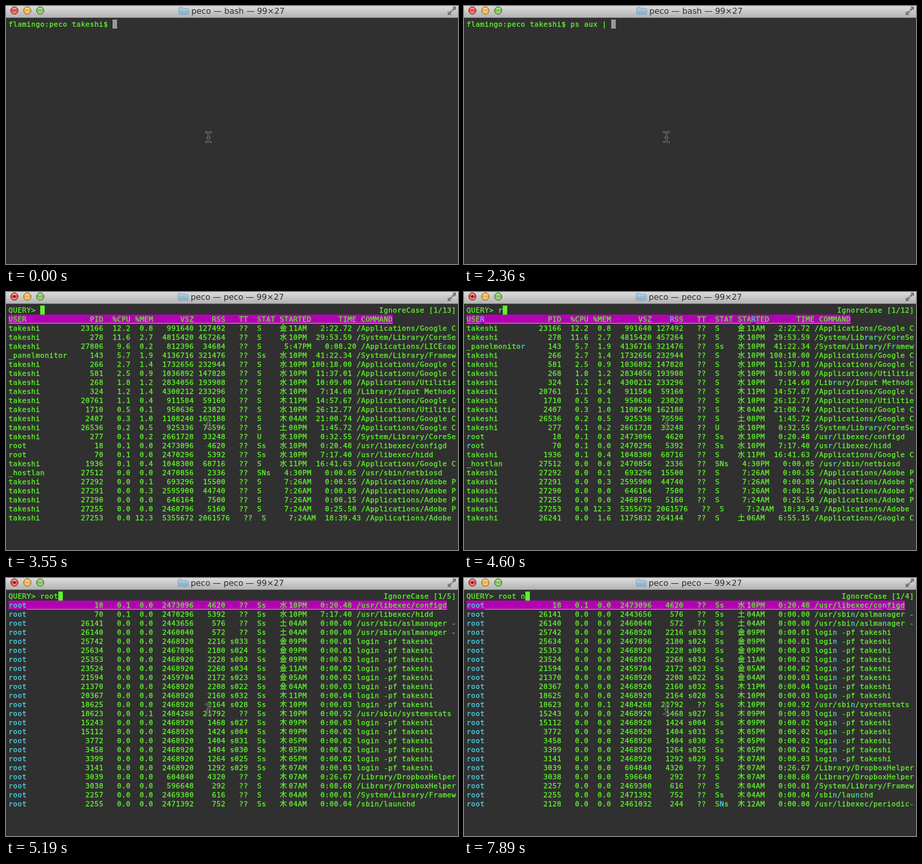
An HTML page for the animation above (8000 ms loop, 700 by 400 pixels).

```html
<!DOCTYPE html>
<html lang="en">
<head>
<meta charset="utf-8">
<title>Terminal: filtering ps with peco</title>
<style>
  html, body { margin: 0; width: 100%; height: 100%; overflow: hidden; background: #303030; }
  svg { display: block; width: 700px; height: 400px; }
  #title { font: 12.6px "DejaVu Sans", sans-serif; fill: #2c2c2c; text-rendering: geometricPrecision; }
  #screen { font: 11px "DejaVu Sans Mono", "Noto Sans CJK JP", "Noto Sans CJK", monospace; color: #5ff42d; }
  #screen * { fill: currentColor; }
  #screen text { stroke: currentColor; stroke-width: .3; }
  #screen .hit { color: #50cfe4; }
  #screen .sel { color: #b400b4; }
  #screen .idle { color: #999; }
</style>
</head>
<body>
<svg viewBox="0 0 700 400">
  <defs>
    <linearGradient id="bar" x2="0" y2="1">
      <stop offset="0" stop-color="#dcdcdc"/><stop offset="1" stop-color="#b2b2b2"/>
    </linearGradient>
    <linearGradient id="shine" x2="0" y2="1">
      <stop offset="0" stop-color="#fff" stop-opacity=".75"/>
      <stop offset=".45" stop-color="#fff" stop-opacity="0"/>
      <stop offset="1" stop-color="#fff" stop-opacity=".5"/>
    </linearGradient>
    <linearGradient id="folder" x2="0" y2="1">
      <stop offset="0" stop-color="#a9cbe0"/><stop offset="1" stop-color="#86aec8"/>
    </linearGradient>
    <path id="beam" d="M309.500 195.500q4 0 4 2.500v10.500q0 2.500-4 2.500M317.500 195.500q-4 0-4 2.500v10.500q0 2.500 4 2.500M311.500 204h4"/>
  </defs>
  <rect width="700" height="400" fill="#303030"/>
  <rect width="700" height="18" fill="url(#bar)"/>
  <rect y="18" width="700" height="1" fill="#4a4a4a"/>
  <g id="lights"></g>
  <circle id="busy" cx="13" cy="7" r="2" fill="#7a1814"/>
  <g id="title">
    <path d="M.5 3.5q0-1.5 1.5-1.5h4l1.5 1.5h7q1.5 0 1.5 1.5v7q0 1-1 1h-13.500q-1 0-1-1z" fill="url(#folder)" stroke="#7c9fb6" stroke-width=".7"/>
    <path d="M1 5.500h14.500" stroke="#bdd7e7" stroke-width=".7"/>
    <text id="name" x="20" y="12"></text>
  </g>
  <path d="M691 1h6v6l-2-2-3 3-2-2 3-3zM690 14h-6v-6l2 2 3-3 2 2-3 3z" fill="#777"/>
  <g id="screen"></g>
  <g fill="none" stroke-linecap="round">
    <use href="#beam" stroke="#959595" stroke-width="2.400"/>
    <use href="#beam" stroke="#222" stroke-width="1.200"/>
  </g>
</svg>
<script>
const LOOP = 8000, LEFT = 4, TOP = 21, CW = 7, CH = 14, COLS = 99, ROWS = 23;
const RUN_AT = 3400, LIST_AT = 3550;
const prompt = 'flamingo:peco takeshi$ ';
const command = {
  text: 'ps aux | peco',
  keys: [890, 1190, 1330, 1480, 1630, 1770, 2070, 2360, 2360, 2660, 2810, 2950, 3100]
};
const query = { text: 'root n', keys: [4600, 4750, 4890, 5190, 7290, 7890] };
const pages = { '': 13, r: 12, ro: 6, roo: 5, root: 5, 'root n': 4 };

const chrome = '/Applications/Google Chrome.app', adobe = '/Applications/Adobe Pro';
const login = 'login -pf takeshi', tools = '/Library/DropboxHelperTools/';
const lines = `USER PID %CPU %MEM VSZ RSS TT STAT STARTED TIME COMMAND
takeshi 23166 12.2 0.8 991640 127492 ?? S 金11AM 2:22.72 ${chrome}
takeshi 278 11.6 2.7 4815420 457264 ?? S 水10PM 29:53.59 /System/Library/CoreServices
takeshi 27806 9.6 0.2 812396 34684 ?? S 5:47PM 0:08.20 /Applications/LICEcap
_panelmonitor 143 5.7 1.9 4136716 321476 ?? Ss 水10PM 41:22.34 /System/Library/Frameworks
takeshi 266 2.7 1.4 1732656 232944 ?? S 水10PM 100:18.00 ${chrome}
takeshi 581 2.5 0.9 1036892 147828 ?? S 水10PM 11:37.01 ${chrome}
takeshi 268 1.8 1.2 2834056 193908 ?? S 水10PM 10:09.00 /Applications/Utilities/Terminal
takeshi 324 1.2 1.4 4300212 233296 ?? S 水10PM 7:14.60 /Library/Input Methods
takeshi 20761 1.1 0.4 911584 59160 ?? S 木11PM 14:57.67 ${chrome}
takeshi 1710 0.5 0.1 950636 23820 ?? S 水10PM 26:12.77 /Applications/Utilities/Terminal
takeshi 2407 0.3 1.0 1108240 162188 ?? S 木04AM 21:00.74 ${chrome}
takeshi 26536 0.2 0.5 925336 76596 ?? S 土08PM 1:45.72 ${chrome}
takeshi 277 0.1 0.2 2661728 33248 ?? U 水10PM 0:32.55 /System/Library/CoreServices
root 18 0.1 0.0 2473096 4620 ?? Ss 水10PM 0:20.48 /usr/libexec/configd
root 70 0.1 0.0 2470296 5392 ?? Ss 水10PM 7:17.40 /usr/libexec/hidd
takeshi 1936 0.1 0.4 1048300 68716 ?? S 水11PM 16:41.63 ${chrome}
_hostlan 27512 0.0 0.0 2470856 2336 ?? SNs 4:30PM 0:00.05 /usr/sbin/netbiosd
takeshi 27292 0.0 0.1 693296 15500 ?? S 7:26AM 0:00.55 ${adobe}
takeshi 27291 0.0 0.3 2595900 44740 ?? S 7:26AM 0:00.89 ${adobe}
takeshi 27290 0.0 0.0 646164 7500 ?? S 7:26AM 0:00.15 ${adobe}
takeshi 27255 0.0 0.0 2460796 5160 ?? S 7:24AM 0:25.50 ${adobe}
takeshi 27253 0.0 12.3 5355672 2061576 ?? S 7:24AM 18:39.43 ${adobe}
takeshi 26241 0.0 1.6 1175832 264144 ?? S 土06AM 6:55.15 ${chrome}
root 26141 0.0 0.0 2443656 576 ?? Ss 土04AM 0:00.00 /usr/sbin/aslmanager -s
root 26140 0.0 0.0 2460040 572 ?? Ss 土04AM 0:00.00 /usr/sbin/aslmanager -s
takeshi 26029 0.0 0.8 1057828 142220 ?? S 金10PM 1:42.06 ${chrome}
takeshi 25983 0.0 0.5 908212 81052 ?? S 金10PM 0:08.03 ${chrome}
root 25742 0.0 0.0 2468920 2216 s033 Ss 金09PM 0:00.01 ${login}
root 25634 0.0 0.0 2467896 2180 s024 Ss 金09PM 0:00.01 ${login}
root 25353 0.0 0.0 2468920 2228 s003 Ss 金09PM 0:00.03 ${login}
takeshi 24757 0.0 0.6 967560 104740 ?? S 金06PM 0:49.52 ${chrome}
root 23524 0.0 0.0 2468920 2268 s034 Ss 金11AM 0:00.02 ${login}
root 21594 0.0 0.0 2459704 2172 s023 Ss 金05AM 0:00.02 ${login}
root 21370 0.0 0.0 2468920 2208 s022 Ss 金04AM 0:00.03 ${login}
root 20367 0.0 0.0 2468920 2160 s032 Ss 木11PM 0:00.04 ${login}
root 18625 0.0 0.0 2468920 2164 s028 Ss 木10PM 0:00.03 ${login}
root 18623 0.0 0.1 2484268 21792 ?? Ss 木10PM 0:00.92 /usr/sbin/systemstats
root 15243 0.0 0.0 2468920 1468 s027 Ss 木09PM 0:00.03 ${login}
root 15112 0.0 0.0 2468920 1424 s004 Ss 木09PM 0:00.02 ${login}
root 3772 0.0 0.0 2468920 1404 s031 Ss 木05PM 0:00.02 ${login}
root 3458 0.0 0.0 2468920 1404 s030 Ss 木05PM 0:00.02 ${login}
root 3399 0.0 0.0 2468920 1264 s025 Ss 木05PM 0:00.02 ${login}
root 3141 0.0 0.0 2468920 1292 s029 Ss 木07AM 0:00.03 ${login}
root 3039 0.0 0.0 604840 4320 ?? S 木07AM 0:26.67 ${tools}dbfseventsd
root 3038 0.0 0.0 596648 292 ?? S 木07AM 0:08.68 ${tools}dbfseventsd
root 2257 0.0 0.0 2469300 616 ?? S 木04AM 0:00.01 /System/Library/Frameworks/Foundation
root 2255 0.0 0.0 2471392 752 ?? Ss 木04AM 0:00.04 /sbin/launchd
root 2128 0.0 0.0 2461032 244 ?? SNs 木12AM 0:00.00 /usr/libexec/periodic-wrapper`
  .split('\n').map(formatLine);

// Lay the fields out as ps does; a kanji weekday fills two columns.
function formatLine(line) {
  const [user, pid, cpu, mem, vsz, rss, tt, stat, start, time, ...cmd] = line.split(' ');
  const begun = isWide(start[0]) ? start : start.padStart(7);
  return user.padEnd(16) + pid.padStart(5) + cpu.padStart(6) + mem.padStart(5) + ' ' +
    [vsz.padStart(8), rss.padStart(6), tt.padStart(4)].join(' ') + '  ' +
    [stat.padEnd(4), begun, time.padStart(9), cmd.join(' ')].join(' ');
}

function isWide(ch) { return ch > '\u3000'; }

const $ = id => document.getElementById(id);
const colX = col => LEFT + col * CW;
const rowY = row => TOP + row * CH;
const rect = (x, y, w, h, cls = '') => `<rect x="${x}" y="${y}" width="${w}" height="${h}" class="${cls}"/>`;
const cursor = (col, row, cls) => rect(colX(col), rowY(row), CW, CH, cls);
const typed = ({ text, keys }, t) => text.slice(0, keys.filter(k => t >= k).length);

function textRun(cells, row, cls = '') {
  const ink = cells.filter(c => c.ch !== ' ');
  if (!ink.length) return '';
  const xs = ink.map(c => colX(c.col)).join(' ');
  const chars = ink.map(c => c.ch.replace('>', '&gt;')).join('');
  return `<text x="${xs}" y="${rowY(row) + 11}" class="${cls}">${chars}</text>`;
}

function put(text, row, { col = 0, terms = [], selected = false } = {}) {
  const hit = new Set(), lower = text.toLowerCase();
  for (const term of terms)
    for (let i = lower.indexOf(term); i >= 0; i = lower.indexOf(term, i + term.length))
      for (let k = 0; k < term.length; k++) hit.add(i + k);

  const runs = [];
  [...text].forEach((ch, i) => {
    if (col >= COLS) return;
    const on = hit.has(i), width = isWide(ch) ? 2 : 1;
    let run = runs[runs.length - 1];
    if (!run || run.on !== on) runs.push(run = { on, from: col, cells: [] });
    run.cells.push({ ch, col });
    run.to = col += width;
  });

  let out = selected ? rect(LEFT, rowY(row), col * CW - LEFT + colX(0), CH, 'sel') : '';
  for (const { on, from, to, cells } of runs) {
    if (selected && !on) out += rect(colX(from), rowY(row) + 13, (to - from) * CW, 1);
    out += textRun(cells, row, on ? 'hit' : '');
  }
  return out;
}

function shell(t) {
  const text = prompt + typed(command, t);
  const running = t >= RUN_AT;
  return put(text, 0) + cursor(running ? 0 : text.length, running ? 1 : 0, 'idle');
}

function finder(t) {
  const q = typed(query, t), terms = q.split(' ').filter(Boolean);
  const input = 'QUERY> ' + q, status = `IgnoreCase [1/${pages[q.trim()]}]`;
  const found = lines.filter(l => terms.every(w => l.toLowerCase().includes(w))).slice(0, ROWS);
  return put(input, 0) + cursor(input.length, 0) +
    put(status, 0, { col: COLS - status.length }) +
    found.map((l, i) => put(l, i + 1, { terms, selected: i === 0 })).join('');
}

let shown = '';
function draw(t) {
  const listing = t >= LIST_AT;
  const key = [listing, t >= RUN_AT, typed(command, t), typed(query, t)].join();
  if (key === shown) return;
  shown = key;
  $('busy').setAttribute('visibility', listing ? 'visible' : 'hidden');
  $('title').setAttribute('transform', `translate(${listing ? 266 : 267} 0)`);
  $('name').textContent = `peco — ${listing ? 'peco' : 'bash'} — 99×27`;
  $('screen').innerHTML = listing ? finder(t) : shell(t);
}

$('lights').innerHTML = [['#e0443a', '#8d2a24'], ['#f0ad3a', '#94661c'], ['#72c04a', '#3f7426']]
  .map(([fill, edge], i) => {
    const at = `cx="${13 + 20 * i}" cy="7"`;
    return `<circle ${at} r="5.700" fill="${fill}" stroke="${edge}"/><circle ${at} r="4.600" fill="url(#shine)"/>`;
  }).join('');

const begin = performance.now();
function tick() {
  draw((performance.now() - begin) % LOOP);
  requestAnimationFrame(tick);
}
tick();
</script>
</body>
</html>
```
